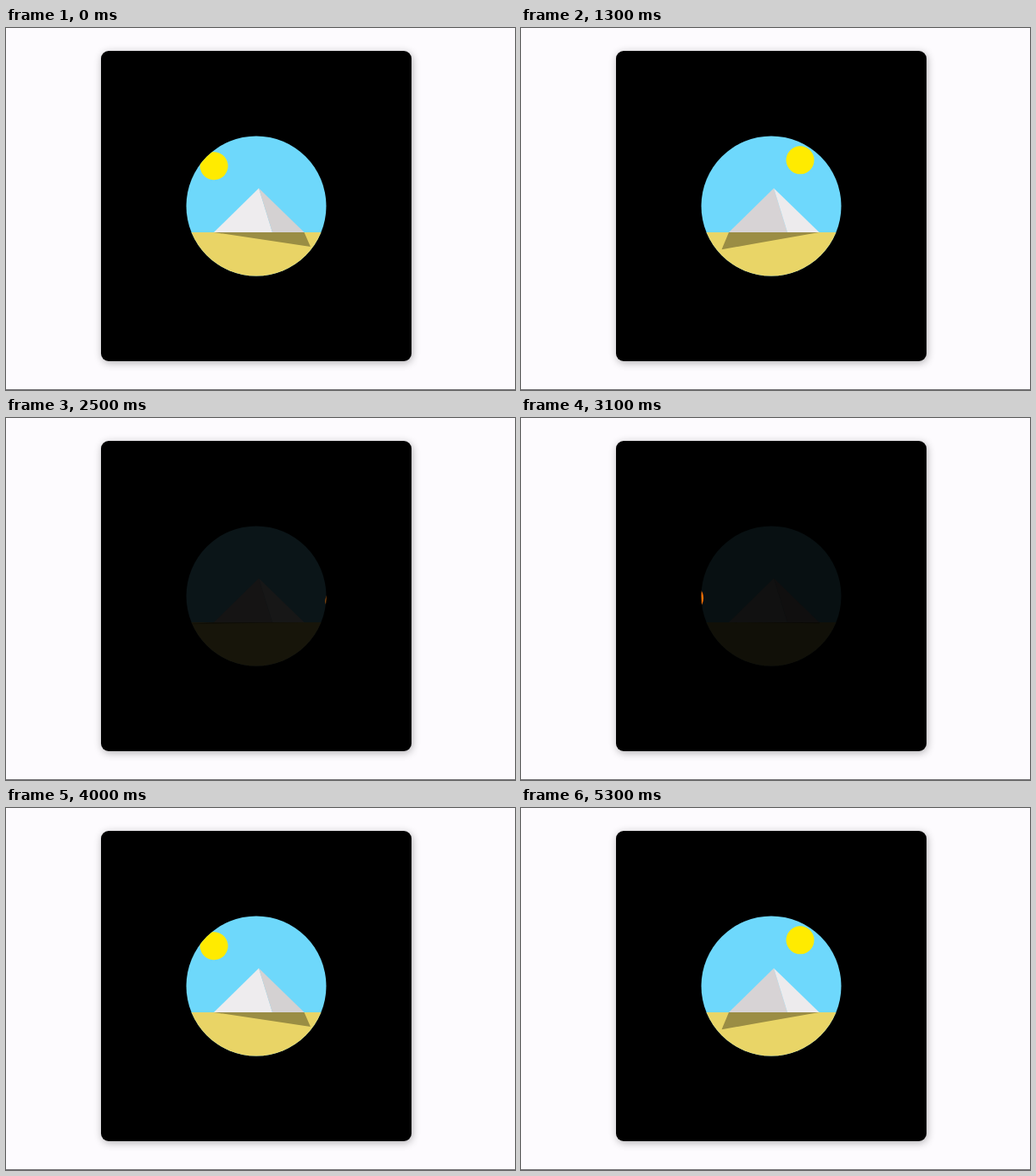
Animation of 600 by 427 pixels, one loop 5.4 s. Source, as an HTML page:

```html
<!DOCTYPE html>
<html lang="en">
<head>
<meta charset="utf-8">
<title>Pyramid by day and night</title>
<style>
  html, body { margin: 0; width: 100%; height: 100%; overflow: hidden; background: #fdfbfe; }
  .stage { position: relative; width: 600px; height: 427px; overflow: hidden; }
  .panel {
    position: absolute; left: 112px; top: 27px; width: 366px; height: 366px;
    border-radius: 9px; background: #000; box-shadow: 1px 2px 10px rgba(0, 0, 0, .3);
  }
  .rule { position: absolute; left: 0; top: 426px; width: 600px; height: 1px; background: #747276; }
  svg { position: absolute; left: 0; top: 0; }
</style>
</head>
<body>
<div class="stage">
  <div class="panel"></div>
  <div class="rule"></div>
  <svg width="600" height="427" viewBox="0 0 600 427">
    <clipPath id="porthole"><circle cx="295" cy="210" r="82.5"/></clipPath>
    <g clip-path="url(#porthole)">
      <rect id="sky" x="212" y="127" width="166" height="166"/>
      <circle id="sun" cx="295" cy="150.2" r="16.5"/>
      <rect id="desert" x="212" y="241" width="166" height="52"/>
      <path id="left" d="M298 189 L314 241 H245 Z"/>
      <path id="right" d="M298 189 L351.5 241 H314 Z"/>
      <path id="shadow"/>
    </g>
  </svg>
</div>
<script>
const LOOP = 5400, STEP = 100, DAY = 4000, DAY_OFFSET = 1150;
const HORIZON = 241;
const BLACK = [0, 0, 0];
const LIGHT = [241, 239, 241], SHADE = [218, 215, 216];
const SKY = [123, 221, 252], SAND = [236, 218, 116];
const DUSK = [250, 114, 9], NOON = [255, 238, 0];

// Each stop is [share of the day, ...values].
const tracks = {
  sunAngle: [[0, -70], [.3, -28], [1, 70]],
  sun: [[0, ...DUSK], [.3, ...NOON], [.7, ...NOON], [1, ...DUSK]],
  sky: daylight(SKY, SKY),
  desert: daylight(SAND, SAND),
  left: daylight(LIGHT, SHADE),
  right: daylight(SHADE, LIGHT),
  shadowTip: [[0, 351.5, 0], [.35, 359.3, 17.8], [.67, 230.6, 20.3], [1, 211.7, 0]]
};

function daylight(morning, evening) {
  return [[0, ...BLACK], [.3, ...morning], [.7, ...evening], [1, ...BLACK]];
}

// cubic-bezier(.4, 0, .49, 1), solved by bisection
function ease(x) {
  let low = 0, high = 1, s = .5;
  for (let i = 0; i < 24; i++) {
    s = (low + high) / 2;
    const bx = 1.2 * s * (1 - s) ** 2 + 1.47 * s * s * (1 - s) + s ** 3;
    if (bx < x) low = s; else high = s;
  }
  return s * s * (3 - 2 * s);
}

function valuesAt(stops, share) {
  const next = Math.max(1, stops.findIndex(stop => stop[0] > share));
  const [start, ...from] = stops[next - 1];
  const [end, ...to] = stops[next];
  const k = ease((share - start) / (end - start));
  return from.map((v, i) => v + (to[i] - v) * k);
}

// A slight gamma deepens the midtones.
const tone = v => Math.round(255 * (v / 255) ** 1.154);
const rgb = color => `rgb(${color.map(tone).join()})`;
const byId = id => document.getElementById(id);

function draw(time) {
  const share = (time + DAY_OFFSET) % DAY / DAY;
  for (const id of ['sky', 'sun', 'desert', 'left', 'right']) {
    byId(id).setAttribute('fill', rgb(valuesAt(tracks[id], share)));
  }
  const [angle] = valuesAt(tracks.sunAngle, share);
  byId('sun').setAttribute('transform', `rotate(${angle} 295 256)`);

  const [tipX, length] = valuesAt(tracks.shadowTip, share);
  const ground = valuesAt(tracks.desert, share).map(v => v * .7);
  byId('shadow').setAttribute('d', `M245 ${HORIZON} H351.5 L${tipX} ${HORIZON + length} Z`);
  byId('shadow').setAttribute('fill', rgb(ground));
}

const began = performance.now();
function tick() {
  const time = (performance.now() - began) % LOOP;
  draw(Math.floor(time / STEP) * STEP);
  requestAnimationFrame(tick);
}
tick();
</script>
</body>
</html>
```
